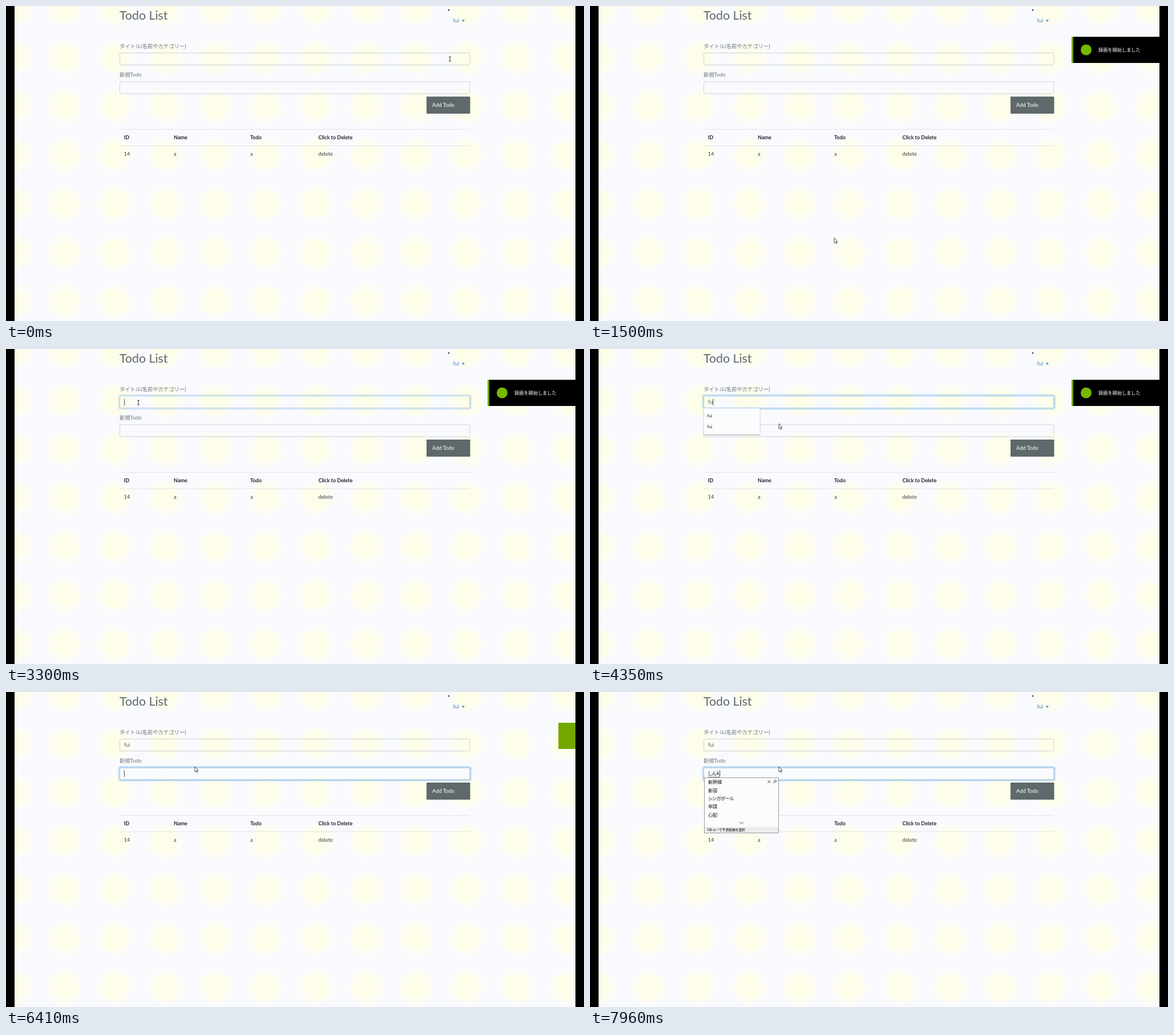
An HTML page that plays this animation: 1013 by 553 pixels, repeating every 8000 ms.

```html
<!DOCTYPE html>
<html lang="ja">
<head>
<meta charset="utf-8">
<title>Todo List</title>
<style>
  html, body { margin: 0; width: 100%; height: 100%; overflow: hidden; background: #000; }
  svg { display: block; width: 1013px; height: 553px; }
  text { font: 9.3px Lato, "Noto Sans CJK JP", "Noto Sans CJK", sans-serif; fill: #3c4347; white-space: pre; }
  .title { font-size: 21.3px; fill: #5f676c; }
  .label { fill: #6c757b; }
  .head { font-weight: 700; font-size: 9.1px; fill: #212529; }
  .value { font-size: 9px; fill: #596167; }
  .option { font-size: 7.5px; fill: #222; }
  .ime { font-family: "Noto Sans CJK JP", "Noto Sans CJK", sans-serif; font-size: 8.2px; fill: #111;
         font-feature-settings: "palt"; letter-spacing: -.2px; }
  .field { fill: none; stroke: #cdd3d6; }
  .ring { fill: none; stroke: #a1cbef; }
  .glow { fill: none; stroke: #3490dc; stroke-opacity: .25; stroke-width: 3; }
  .line { stroke: #dfe3e2; }
  .thin { fill: none; stroke: #333; stroke-width: .9; }
</style>
</head>
<body>
<svg viewBox="0 0 1013 553">
  <defs>
    <radialGradient id="blob">
      <stop offset="0" stop-color="#fdfde8"/>
      <stop offset=".5" stop-color="#fdfdea"/>
      <stop offset=".78" stop-color="#fcfcf4"/>
      <stop offset="1" stop-color="#fafbfe" stop-opacity="0"/>
    </radialGradient>
    <pattern id="dots" x="59" y="48" width="88" height="85.5" patternUnits="userSpaceOnUse">
      <circle cx="44" cy="42.7" r="35" fill="url(#blob)"/>
    </pattern>
    <filter id="soft" x="-10%" y="-10%" width="120%" height="130%">
      <feDropShadow dx="0" dy="1" stdDeviation="1" flood-opacity=".4"/>
    </filter>
  </defs>

  <rect x="15" width="983" height="553" fill="#f9fafe"/>
  <rect x="15" width="983" height="553" fill="url(#dots)"/>

  <text class="title" x="199" y="24">Todo List</text>
  <circle cx="776" cy="7" r="1.6" fill="#4d565c"/>
  <text x="783.5" y="29.3" style="fill:#4380c6">fui</text>
  <path d="M798.5 24.5h5.6l-2.8 2.9z" fill="#3873b8"/>

  <text class="label" x="199" y="73.7">タイトル(名前やカテゴリー)</text>
  <text class="label" x="199" y="124">新規Todo</text>
  <rect class="field" x="199.5" y="82.5" width="613.5" height="21" rx="2"/>
  <rect class="field" x="199.5" y="133" width="613.5" height="21" rx="2"/>
  <g id="titleFocus"></g>
  <g id="todoFocus"></g>
  <rect x="737" y="159" width="76.5" height="30" rx="1" fill="#5f696c"/>
  <text x="747" y="177.3" style="fill:#fff">Add Todo</text>

  <path class="line" d="M199 216.5H813.500M199 245.300H813.500"/>
  <g id="table"></g>

  <text class="value" id="titleText" x="207" y="96.300"></text>
  <text class="value ime" id="todoText" x="207" y="146.300"></text>
  <path id="underline" stroke="#555" stroke-width=".8"/>
  <path id="caret" stroke="#333" stroke-width=".9"/>

  <g id="options" filter="url(#soft)">
    <rect id="optionsBox" x="199.500" y="104" width="98" fill="#fbfcfe"/>
    <g id="optionRows"></g>
  </g>

  <g id="mode">
    <rect x="465" y="235" width="83" height="83" fill="#000"/>
    <text x="506.500" y="300" text-anchor="middle" style="font-size:58px;fill:#fff">あ</text>
  </g>

  <g id="candidates">
    <rect x="200.500" y="150.500" width="130" height="97" fill="#fcfcfd" stroke="#969a9e"/>
    <rect x="201" y="237" width="129" height="10" fill="#ebecee"/>
    <g id="candidateRows"></g>
    <path class="thin" d="M311.500 155l5 5m0-5l-5 5M321 160l2.500-2.500M262 228l3.500 3.500 3.500-3.500"/>
    <circle class="thin" cx="324.600" cy="156.300" r="1.900"/>
    <text class="ime" x="204.500" y="244.200" style="font-size:6px">Tab キーで予測候補を選択</text>
  </g>

  <g id="toast">
    <rect id="green" y="54" height="46" fill="#73a700"/>
    <rect id="black" y="54" height="46"/>
    <g id="toastBody">
      <circle cx="869.500" cy="77" r="9.500" fill="#76b900"/>
      <text x="891" y="79.500" style="font-size:8.200px;fill:#fff">録画を開始しました</text>
    </g>
  </g>

  <path id="arrow" d="M0 0V9L2 7.200 3.500 10.300 4.800 9.700 3.500 6.700H6Z" fill="#fff" stroke="#222" stroke-width=".8"/>
  <path id="beam" d="M-2-3.800H2M0-3.800V3.800M-2 3.800H2" stroke="#222" stroke-width=".9" fill="none"/>
</svg>
<script>
const $ = id => document.getElementById(id);
const clamp = v => Math.max(0, Math.min(1, v));
const ramp = (t, a, b) => clamp((t - a) / (b - a));
const ease = p => p * p * (3 - 2 * p);
const slide = (t, a, b) => ease(ramp(t, a, b));
const within = (t, a, b) => t >= a && t < b;
const show = (id, opacity) => $(id).setAttribute('opacity', opacity);
const put = (id, html) => { if ($(id).dataset.html !== html) $(id).innerHTML = $(id).dataset.html = html; };
const label = (x, y, s, cls) => `<text class="${cls}" x="${x}" y="${y}">${s}</text>`;

const columns = [206.500, 294, 428, 547.500];
const row = (cells, y, cls) => cells.map((s, i) => label(columns[i], y, s, cls)).join('');
put('table', row(['ID', 'Name', 'Todo', 'Click to Delete'], 234.200, 'head') + row([14, 'a', 'a', 'delete'], 262.700, ''));

const ring = y => `<rect class="glow" x="198" y="${y - 1.500}" width="616.500" height="24" rx="3"/>
  <rect class="ring" x="199.500" y="${y}" width="613.500" height="21" rx="2"/>`;
put('titleFocus', ring(82.500));
put('todoFocus', ring(133));

// Each entry: start time, value
const at = (steps, t) => steps.reduce((value, s) => t >= s[0] ? s[1] : value, '');
const titleSteps = [[4200, 'f'], [4300, 'fu'], [4550, 'fui']];
const todoSteps = [[7360, 'ｓ'], [7460, 'し'], [7560, 'しｎ'], [7660, 'しん'], [7910, 'しんｋ']];
const blinkSteps = [[3200, 1], [3700, 0], [4200, 1], [5560, 0], [6010, 1], [6510, 0], [7360, 1]];
const names = ['fui', 'fui', 'form', 'file', 'first', 'final'];
const listSteps = [
  [7460, ['新規', 'します', 'しました', '資料', '写真']],
  [7660, ['新幹線', '新宿', 'シンガポール', '申請', '心配']]
];

// Pointer stops: time, x, y
const stops = [
  [350, 778, 93], [1100, 438, 412], [1500, 428, 407], [2000, 340, 398], [2250, 314, 437],
  [2400, 314, 437], [2750, 259, 128], [3100, 232, 94], [3300, 232, 94], [3800, 331, 131]
];
function pointer(t) {
  const i = stops.findIndex(s => s[0] > t);
  if (i === 0) return stops[0].slice(1);
  if (i < 0) return stops[stops.length - 1].slice(1);
  const [a, b] = [stops[i - 1], stops[i]], p = slide(t, a[0], b[0]);
  return [a[1] + (b[1] - a[1]) * p, a[2] + (b[2] - a[2]) * p];
}

function drawPointer(t) {
  const [x, y] = pointer(t);
  const overField = within(x, 200, 813) && (within(y, 83, 104) || within(y, 133, 154));
  for (const id of ['arrow', 'beam']) $(id).setAttribute('transform', `translate(${x} ${y})`);
  show('arrow', overField ? 0 : 1);
  show('beam', overField ? 1 : 0);
}

function drawToast(t) {
  const bar = (id, full, p) => {
    $(id).setAttribute('x', 998 - full * p);
    $(id).setAttribute('width', full * p);
  };
  bar('green', 154, slide(t, 350, 650) - slide(t, 6210, 6490));
  bar('black', 151, slide(t, 600, 900) - slide(t, 6010, 6260));
  show('toastBody', ramp(t, 850, 1050) - ramp(t, 5950, 6060));
}

function drawForm(t) {
  const inTodo = t >= 4950;
  show('titleFocus', ramp(t, 3200, 3350) - ramp(t, 4950, 5100));
  show('todoFocus', ramp(t, 4950, 5100));
  put('titleText', at(titleSteps, t));
  put('todoText', at(todoSteps, t));

  const active = $(inTodo ? 'todoText' : 'titleText');
  const width = active.textContent ? active.getComputedTextLength() : 0;
  const y = inTodo ? 137.500 : 87.500;
  $('caret').setAttribute('d', `M${207.500 + width} ${y}v11.500`);
  show('caret', at(blinkSteps, t) || 0);
  $('underline').setAttribute('d', inTodo && width ? `M207 149.300h${width}` : '');

  const rows = t < 4300 ? 6 : 2;
  $('optionsBox').setAttribute('height', 9 + rows * 18.500);
  put('optionRows', names.slice(0, rows).map((s, i) => label(205.500, 120.300 + i * 18.500, s, 'option')).join(''));
  show('options', ramp(t, 4190, 4210) - ramp(t, 4580, 4700));
}

function drawIme(t) {
  show('mode', t < 6860 ? .5 * ramp(t, 6700, 6860) : .5 * (1 - ramp(t, 6860, 7560)));
  const list = at(listSteps, t);
  show('candidates', list ? 1 : 0);
  if (list) put('candidateRows', list.map((s, i) => label(207, 161.200 + i * 14.400, s, 'ime')).join(''));
}

function frame() {
  const t = performance.now() % 8000;
  drawToast(t);
  drawForm(t);
  drawIme(t);
  drawPointer(t);
  requestAnimationFrame(frame);
}
frame();
</script>
</body>
</html>
```
